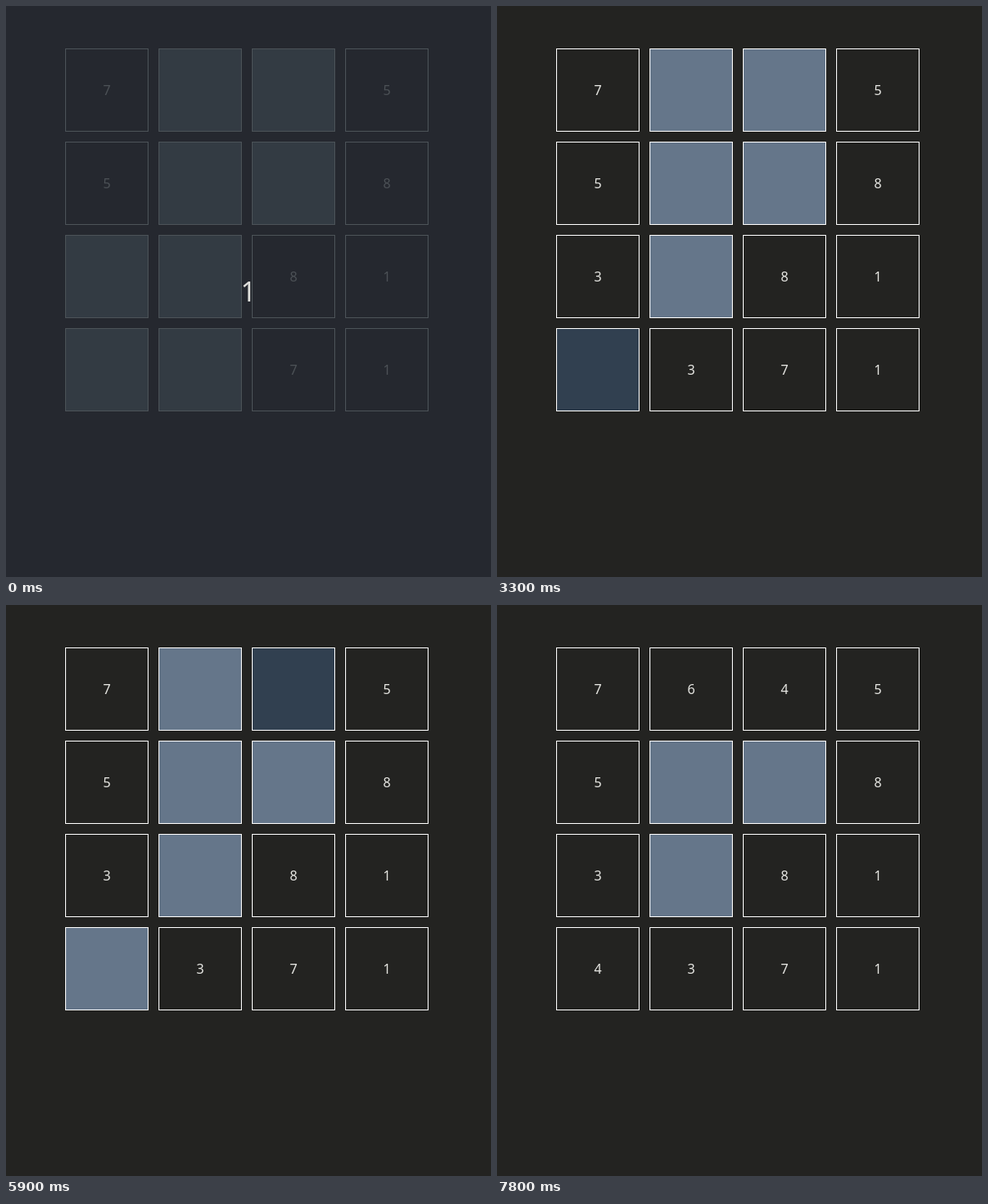
Write an HTML page that moves like this. It is 582x686 px and loops after 8000 ms.

```html
<!DOCTYPE html>
<html lang="en">
<head>
<meta charset="utf-8">
<title>Memory game</title>
<style>
  html, body { margin: 0; width: 100%; height: 100%; overflow: hidden; background: #232321; }
  svg { display: block; width: 582px; height: 686px; font-family: "Noto Sans", "Open Sans", sans-serif; }
  text { text-anchor: middle; }
</style>
</head>
<body>
<svg id="stage" viewBox="0 0 582 686"></svg>
<script>
const LOOP = 8000;
const INTRO = 100;
const VALUES = "7645562832814371";
const SOLVED = [0, 3, 4, 7, 10, 11, 14, 15];
const PLAY = { page: "#232321", open: "#232321", closed: "#65768a", hover: "#314050", line: "#ffffff", ink: "#e6e6e2" };
const DIM = { page: "#25282f", open: "#25282f", closed: "#333b43", hover: "#333b43", line: "#4c5358", ink: "#4c5156" };

// [time, hovered cell, cells turned up, cells turned back]
const MOVES = [
  [400, 8], [800, 8, [8]],
  [1100, 12], [1400, 12, [12]], [1700, 13, [], [8, 12]],
  [2100, 13, [13]], [2300, 9], [2600, 8], [2900, 8, [8]],
  [3300, 12], [3500, 12, [12]], [3600, 9], [3800, 5], [3900, 6],
  [4100, 6, [6]], [4400, 5, [], [12, 6]],
  [4700, 5, [5]], [5000, 9], [5200, -1], [5300, 2],
  [5500, 2, [2]], [5900, 2, [], [5, 2]],
  [6200, 2, [2]], [6300, 6], [6500, -1], [6700, 12],
  [7000, 12, [12]], [7200, 5], [7300, -1],
  [7600, 1], [7800, 1, [1]]
];

const stage = document.getElementById("stage");

function add(tag, attrs, text = "") {
  const el = document.createElementNS("http://www.w3.org/2000/svg", tag);
  for (const key in attrs) el.setAttribute(key, attrs[key]);
  el.textContent = text;
  return stage.appendChild(el);
}

const page = add("rect", { width: 582, height: 686 });
const tiles = [...VALUES].map((value, i) => {
  const x = 71 + 112 * (i % 4);
  const y = 51 + 112 * Math.floor(i / 4);
  return {
    box: add("rect", { x: x + 0.5, y: y + 0.5, width: 99, height: 99 }),
    label: add("text", { x: x + 50, y: y + 56, "font-size": 16 }, value)
  };
});
const count = add("text", { x: 291, y: 355, "font-size": 32, fill: "#dededa" }, "1");

function stateAt(t) {
  const open = new Set(SOLVED);
  let hover = -1;
  for (const [time, cell, up = [], down = []] of MOVES) {
    if (time > t) break;
    hover = cell;
    up.forEach(i => open.add(i));
    down.forEach(i => open.delete(i));
  }
  return { open, hover };
}

function draw(t) {
  const intro = t < INTRO;
  const look = intro ? DIM : PLAY;
  const { open, hover } = stateAt(t);
  page.setAttribute("fill", look.page);
  count.setAttribute("visibility", intro ? "visible" : "hidden");
  tiles.forEach(({ box, label }, i) => {
    const shown = open.has(i);
    box.setAttribute("fill", shown ? look.open : i === hover ? look.hover : look.closed);
    box.setAttribute("stroke", look.line);
    label.setAttribute("fill", look.ink);
    label.setAttribute("visibility", shown ? "visible" : "hidden");
  });
}

const start = performance.now();
function tick() {
  draw((performance.now() - start) % LOOP);
  requestAnimationFrame(tick);
}
draw(0);
requestAnimationFrame(tick);
</script>
</body>
</html>
```
